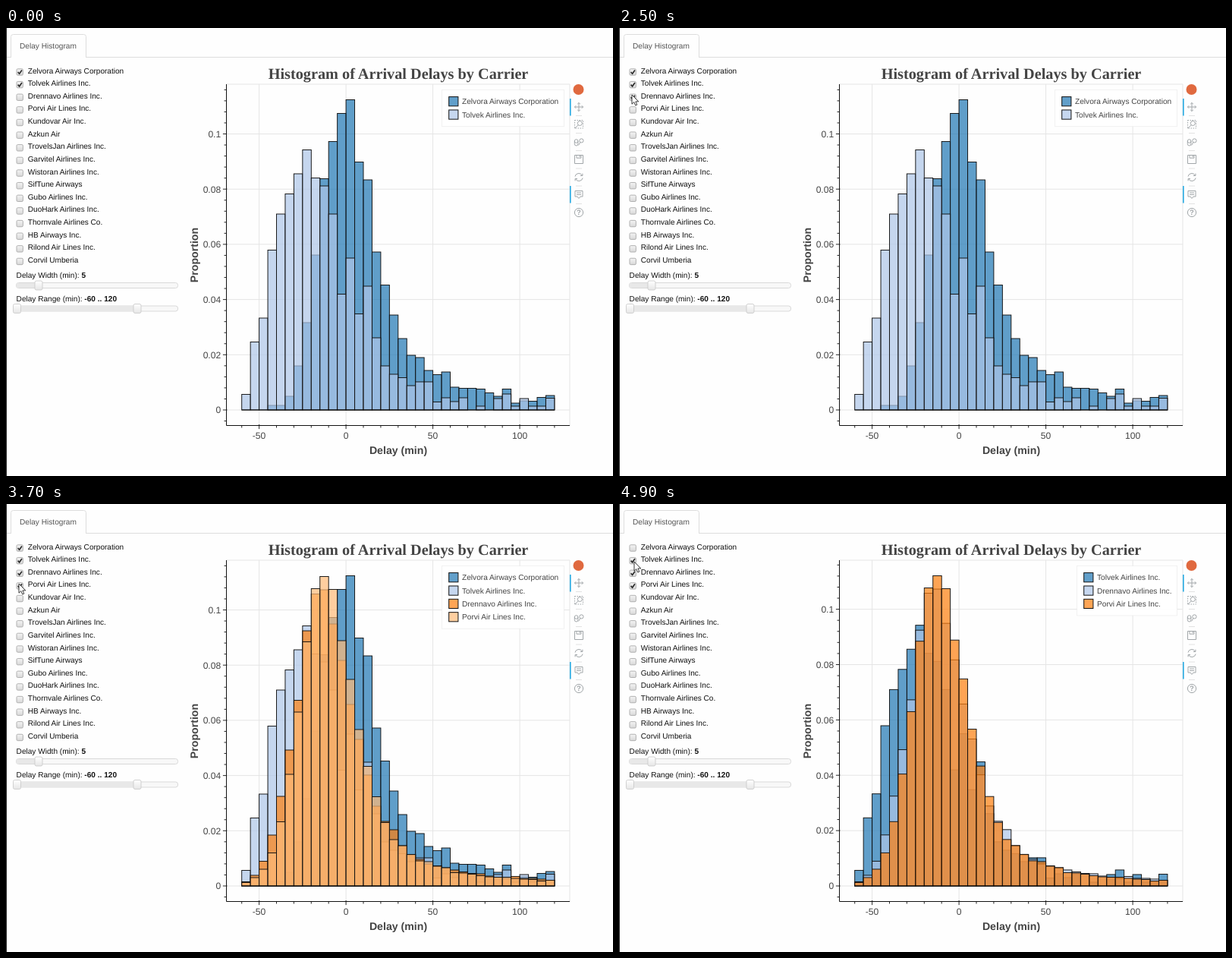
Animation, 800 px wide and 590 px high, one loop 5000 ms. Source, as an HTML page:

```html
<!DOCTYPE html>
<html lang="en">
<head>
<meta charset="utf-8">
<title>Delay Histogram</title>
<style>
  html, body { margin: 0; width: 100%; height: 100%; overflow: hidden; background: #fefefe; }
  svg { display: block; width: 800px; height: 590px; font-family: "Liberation Sans", Arial, sans-serif; text-rendering: geometricPrecision; }
</style>
</head>
<body>
<svg id="stage" viewBox="0 0 800 590">
  <defs>
    <linearGradient id="knob" x1="0" y1="0" x2="0" y2="1">
      <stop offset="0" stop-color="#fff"/><stop offset="1" stop-color="#e6e6e6"/>
    </linearGradient>
    <linearGradient id="box" x1="0" y1="0" x2="0" y2="1">
      <stop offset="0" stop-color="#f4f4f4"/><stop offset="1" stop-color="#d8d8d8"/>
    </linearGradient>
  </defs>
  <g id="panel"></g>
  <g id="chart"></g>
  <g id="frame"></g>
  <g id="tools" fill="none" stroke="#a1a6a9"></g>
  <path id="cursor" d="M0 0V12.2L2.8 9.6L4.8 14L6.8 13.1L4.9 8.9H8.8Z" fill="#fff" stroke="#222" stroke-width="0.9"/>
</svg>
<script>
const NS = "http://www.w3.org/2000/svg";
const $ = id => document.getElementById(id);

function add(parent, tag, attrs, text) {
  const el = document.createElementNS(NS, tag);
  for (const k in attrs) el.setAttribute(k, attrs[k]);
  if (text !== undefined) el.textContent = text;
  parent.appendChild(el);
  return el;
}
const rect = (p, x, y, width, height, more) => add(p, "rect", { x, y, width, height, ...more });
const line = (p, x1, y1, x2, y2, stroke, more) => add(p, "line", { x1, y1, x2, y2, stroke, ...more });
const label = (p, x, y, size, text, more) => add(p, "text", { x, y, "font-size": size, fill: "#444", ...more }, text);

const carriers = [
  "Zelvora Airways Corporation", "Tolvek Airlines Inc.", "Drennavo Airlines Inc.",
  "Porvi Air Lines Inc.", "Kundovar Air Inc.", "Azkun Air", "TrovelsJan Airlines Inc.",
  "Garvitel Airlines Inc.", "Wistoran Airlines Inc.", "SifTune Airways",
  "Gubo Airlines Inc.", "DuoHark Airlines Inc.", "Thornvale Airlines Co.",
  "HB Airways Inc.", "Rilond Air Lines Inc.", "Corvil Umberia"
];

// Bar heights in px, one per five-minute bin from -60 to 120
const heights = [
  [0, 0, 0, 6, 6, 18, 58, 115, 204, 304.5, 353.5, 390.5, 408.5, 326.5, 303, 208, 164.5, 125,
   94, 72, 69, 52, 46.5, 50, 30, 28.5, 28.5, 27.5, 22.5, 18, 27.5, 9, 12, 11.5, 16.5, 19],
  [20.5, 89.5, 121, 210.5, 258, 284.5, 311, 342.5, 305.5, 295, 258, 152.5, 200, 126.5, 163, 95, 58, 47,
   42.5, 32, 37, 37, 10.5, 16, 11, 16, 0, 5, 0, 15, 21, 5, 15, 5, 5, 15.5],
  [5.5, 14, 32.5, 67, 118, 179, 244.5, 336, 384.5, 390, 345, 297, 239, 193, 146, 105, 85, 74,
   53, 41, 35, 29, 26.5, 24, 21, 18.5, 16.5, 16, 13, 11.5, 10, 12.5, 10, 10, 9, 7.5],
  [4.5, 11, 22, 43.5, 84.5, 147, 229, 321.5, 391.5, 407.5, 390.5, 323, 272, 206, 157.5, 117.5, 83.5, 61,
   53, 41.5, 33, 32, 26, 24, 17.5, 17, 15.5, 13.5, 12, 11.5, 11.5, 10, 9, 8.5, 6.5, 7.5]
];
const palette = ["#1f77b4", "#aec7e8", "#ff7f0e", "#ffbb78"];

const plot = { left: 290.5, right: 743, top: 74, bottom: 523.5, zero: 503, peak: 408.5 };
const px = min => 448.1 + min * 2.29;

// Side panel
const checks = [];
function knob(x, y) {
  rect($("panel"), x - 5, y - 6, 10, 12, { rx: 2, fill: "url(#knob)", stroke: "#ccc", "stroke-width": 0.9 });
}
function slider(y, title, value, to, knobs) {
  const g = $("panel");
  const t = label(g, 13.6, y - 10, 10.1, title + " ", { fill: "#111" });
  add(t, "tspan", { "font-weight": "bold" }, value);
  rect(g, 13.5, y - 3.5, 213, 7, { rx: 3, fill: "#f8f8f8", stroke: "#d5d5d5", "stroke-width": 0.9 });
  rect(g, 14, y - 3, to - 14, 6, { rx: 2, fill: "#e8e8e8" });
  knobs.forEach(x => knob(x, y));
}
function buildPanel() {
  const g = $("panel");
  rect(g, 0, 0, 1, 590, { fill: "#222" });
  line(g, 1, 38.5, 800, 38.5, "#ddd");
  add(g, "path", { d: "M6.5 39V11.5Q6.5 8.5 9.5 8.5H102.5Q105.5 8.5 105.5 11.5V39", fill: "#fefefe", stroke: "#ddd" });
  label(g, 18, 27, 10.15, "Delay Histogram", { fill: "#555" });
  carriers.forEach((name, i) => {
    const y = 16.63 * i;
    rect(g, 14, 53.8 + y, 8.4, 8.4, { rx: 1.5, fill: "url(#box)", stroke: "#aaa", "stroke-width": 0.9 });
    checks.push(add(g, "path", {
      d: "M15.7 58L17.6 60.2L21 55.4", transform: `translate(0 ${y})`,
      fill: "none", stroke: "#2c2c2c", "stroke-width": 1.7
    }));
    label(g, 28.8, 59.5 + y, 10.07, name, { fill: "#111" });
  });
  slider(339, "Delay Width (min):", "5", 43, [43]);
  slider(369.5, "Delay Range (min):", "-60 .. 120", 173, [14.5, 173]);
}

// Fixed parts of the plot
function buildFrame() {
  const g = $("frame"), { left, right, top, bottom } = plot;
  line(g, left, top, left, bottom, "#111");
  line(g, left, bottom, right, bottom, "#111");
  for (let m = -60; m <= 120; m += 10) {
    const major = m % 50 === 0, x = px(m);
    line(g, x, bottom - (major ? 1.5 : 0), x, bottom + (major ? 4.6 : 3), "#111", { "stroke-width": 0.9 });
    if (major) label(g, x, 541, 12.1, m, { "text-anchor": "middle" });
  }
  const mid = { "text-anchor": "middle", "font-weight": "bold" };
  label(g, 517, 560.5, 14.15, "Delay (min)", mid);
  label(g, 0, 0, 14.15, "Proportion", { ...mid, transform: "translate(253 299) rotate(-90)" });
  label(g, 517, 66.5, 20.27, "Histogram of Arrival Delays by Carrier",
    { ...mid, "font-family": '"Liberation Serif", "Times New Roman", serif' });
}

function buildTools() {
  const g = $("tools");
  const icon = (y, d) => add(g, "path", { d, transform: `translate(755 ${y})`, "stroke-width": 1 });
  const ring = (x, y, r) => add(g, "circle", { cx: x, cy: y, r });
  add(g, "circle", { cx: 754.5, cy: 81, r: 7, fill: "#e0693f", stroke: "none" });
  [93, 208].forEach(y => rect(g, 743, y, 1.6, 22.5, { fill: "#26aae1", stroke: "none" }));
  [115.5, 138.5, 161.5, 185, 208, 231.5].forEach(y => line(g, 751, y, 759, y, "#e2e2e2"));
  icon(104, "M-5.5 0H5.5M0 -5.5V5.5M-1.8 -3.8L0 -5.6L1.8 -3.8M-1.8 3.8L0 5.6L1.8 3.8M-3.8 -1.8L-5.6 0L-3.8 1.8M3.8 -1.8L5.6 0L3.8 1.8");
  rect(g, 749.5, 121.5, 11, 10.5, { "stroke-dasharray": "1.5 1.5" });
  ring(756.3, 125.5, 3);
  icon(127, "M-1 0.8L-5.5 5.4");
  ring(751.6, 149, 2.3);
  ring(758.4, 148.4, 2.6);
  icon(150, "M-5.7 -1V2.5Q-5.7 5 -3.4 5Q-1.1 5 -1.1 2.5V-1M1.8 0.6L-0.4 4.5");
  icon(173, "M-5.5 -5.5H5.5V5.5H-5.5ZM-3 -5.5V-1.8H3V-5.5M1.3 -5V-3");
  icon(196.5, "M-5 -1A5 5 0 0 1 4.2 -2.6M5 1A5 5 0 0 1 -4.2 2.6M4.9 -4.8V-2H2M-4.9 4.8V2H-2");
  icon(219, "M-5 -4.5H5V3H2L0 5.4L-2 3H-5ZM-3 -2H3M-3 0.4H3");
  ring(755, 243, 5.6);
  label(g, 755, 246.4, 9.5, "?", { fill: "#a1a6a9", stroke: "none", "text-anchor": "middle", "font-weight": "bold" });
}

function drawLegend(g, shown) {
  const left = shown.includes(0) ? 574.5 : 603.5;
  rect(g, left, 81.5, 735.5 - left, 13.5 + 17.3 * shown.length,
    { fill: "#fff", "fill-opacity": 0.95, stroke: "#e5e5e5", "stroke-opacity": 0.5 });
  shown.forEach((c, i) => {
    const y = 17.35 * i;
    rect(g, left + 9.2, 90.6 + y, 12.2, 12.2, { fill: palette[i], "fill-opacity": 0.7, stroke: "#111" });
    label(g, left + 26.5, 100.4 + y, 10.15, carriers[c]);
  });
}

let drawn = "";
function drawChart(shown) {
  if (drawn === shown.join()) return;
  drawn = shown.join();
  const g = $("chart"), { left, right, top, bottom, zero, peak } = plot;
  g.replaceChildren();
  const k = peak / Math.max(...shown.flatMap(c => heights[c]));
  const py = v => zero - v * 3635 * k;

  for (let m = -50; m <= 100; m += 50) line(g, px(m), top, px(m), bottom, "#e5e5e5");
  for (let n = -1; n <= 29; n++) {
    const v = n * 0.004, y = py(v), major = n % 5 === 0;
    line(g, left - (major ? 4.6 : 3), y, left + (major ? 1.5 : 0), y, "#111", { "stroke-width": 0.9 });
    if (!major) continue;
    line(g, left, y, right, y, "#e5e5e5");
    label(g, 283.2, y + 4.3, 12.1, +v.toFixed(2), { "text-anchor": "end" });
  }
  add(g, "path", { d: `M${left} ${top}H${right}V${bottom}`, fill: "none", stroke: "#e5e5e5" });
  shown.forEach((c, i) => heights[c].forEach((h, bin) =>
    rect(g, px(bin * 5 - 60), zero - h * k, 11.45, h * k,
      { fill: palette[i], "fill-opacity": 0.7, stroke: "#111", "stroke-width": 0.95 })));
  // Flat bars still leave their base line
  line(g, px(-60), zero, px(120), zero, "#111");
  drawLegend(g, shown);
}

// Pointer path: time, x, y
const path = [
  [1100, 229, 580], [1600, 52, 257], [2200, 16, 92], [2500, 17, 88], [2800, 17, 90], [3000, 16, 97],
  [3400, 17, 105], [3700, 17, 105], [3900, 17, 99], [4300, 18, 56], [4500, 19, 62], [4700, 19, 66], [4900, 20, 76]
];
function pointer(t) {
  const i = path.findIndex(p => p[0] >= t);
  const b = path[i], a = path[Math.max(0, i - 1)];
  const f = b === a ? 0 : (t - a[0]) / (b[0] - a[0]);
  return [a[1] + (b[1] - a[1]) * f, a[2] + (b[2] - a[2]) * f];
}

// Carriers switched on and off, first in the checkboxes, then in the chart
const active = (t, third, fourth, firstOff) =>
  [t < firstOff, true, t >= third, t >= fourth].flatMap((on, i) => on ? [i] : []);

function render(ms) {
  const t = Math.floor(ms % 5000 / 100) * 100;
  const ticked = active(t, 2500, 3400, 4400);
  checks.forEach((el, i) => el.setAttribute("visibility", ticked.includes(i) ? "visible" : "hidden"));
  drawChart(active(t, 2700, 3600, 4600));
  const cursor = $("cursor");
  cursor.setAttribute("visibility", t >= 1100 ? "visible" : "hidden");
  if (t >= 1100) cursor.setAttribute("transform", `translate(${pointer(t)})`);
}

buildPanel();
buildFrame();
buildTools();
const start = performance.now();
function tick() {
  render(performance.now() - start);
  requestAnimationFrame(tick);
}
tick();
</script>
</body>
</html>
```
